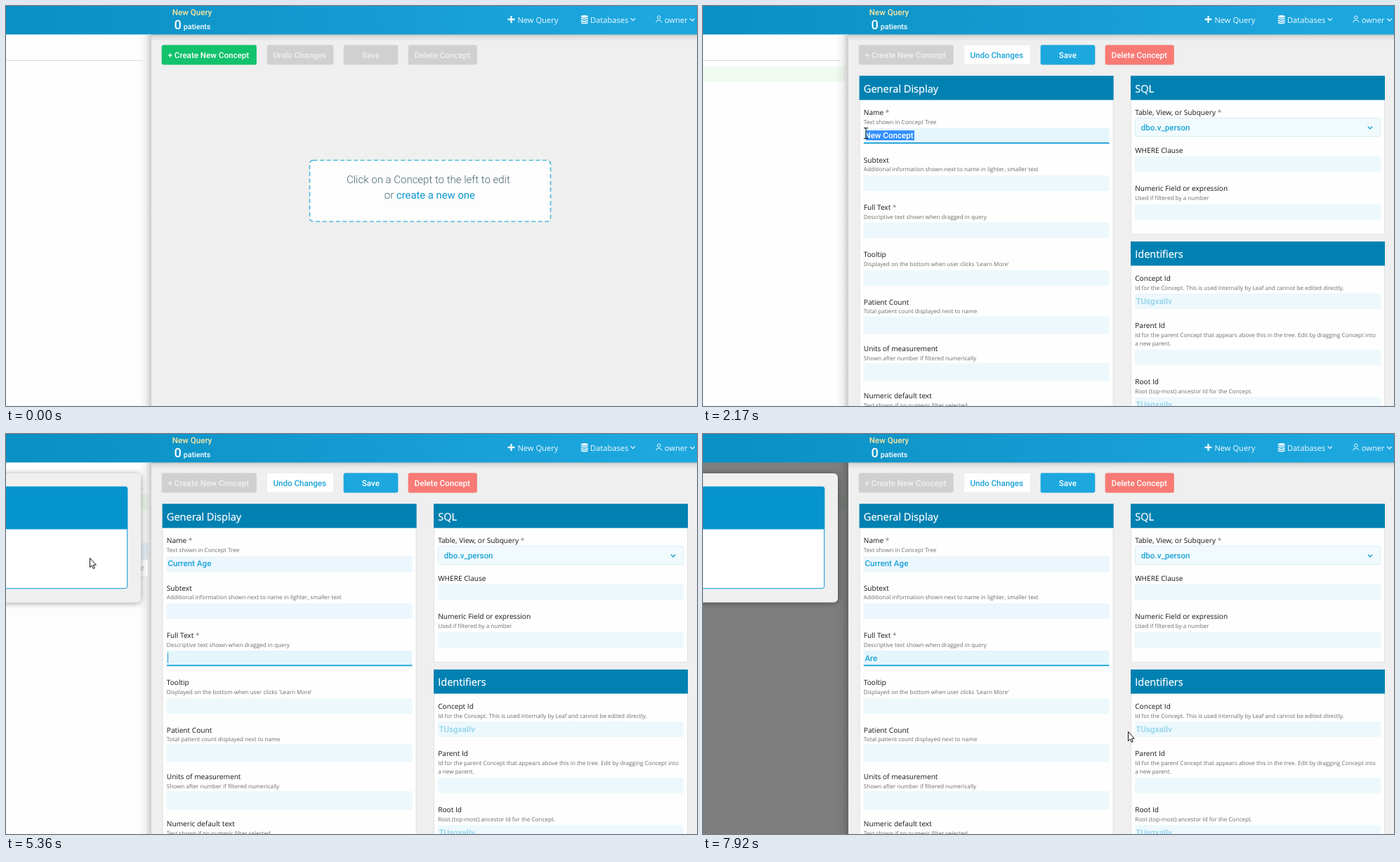
Recreate the animation shown at these times as an HTML page. Size 984 by 569 pixels, loop 8000 ms.

```html
<!DOCTYPE html>
<html lang="en">
<head>
<meta charset="utf-8">
<title>Concept editor</title>
<style>
html, body { margin: 0; width: 100%; height: 100%; overflow: hidden; background: #fefefe; }
svg { display: block; text-rendering: geometricPrecision; }
text { white-space: pre; }
.label { font: 10.15px "Open Sans", "Noto Sans", sans-serif; fill: #161616; }
.note { font: 8.15px "Open Sans", "Noto Sans", sans-serif; fill: #6c6c6c; }
.title { font: 14.55px "Open Sans", "Noto Sans", sans-serif; fill: #fff; stroke: #fff; stroke-width: .25px; }
.nav { font: 11.15px "Open Sans", "Noto Sans", sans-serif; fill: #f2fafe; }
.value { font: 500 11.6px Roboto, sans-serif; fill: #1ca4d8; }
.prompt { font: 300 15px Roboto, sans-serif; fill: #48676b; }
</style>
</head>
<body>
<svg id="stage" width="984" height="569" viewBox="0 0 984 569">
  <defs>
    <linearGradient id="bar" gradientUnits="userSpaceOnUse" x1="0" y1="40" x2="900" y2="0">
      <stop offset="0" stop-color="#0a90c2"/><stop offset=".5" stop-color="#139ad0"/><stop offset="1" stop-color="#1da7df"/>
    </linearGradient>
    <linearGradient id="side"><stop offset="0" stop-opacity="0"/><stop offset=".55" stop-opacity=".05"/><stop offset="1" stop-opacity=".2"/></linearGradient>
    <linearGradient id="under" x2="0" y2="1"><stop offset="0" stop-opacity=".2"/><stop offset=".4" stop-opacity=".07"/><stop offset="1" stop-opacity="0"/></linearGradient>
    <filter id="lift" x="-20%" y="-20%" width="140%" height="140%"><feDropShadow dx="0" dy="1" stdDeviation="4.5" flood-opacity=".38"/></filter>
  </defs>
</svg>
<script>
const LOOP = 8000;
const stage = document.getElementById('stage');
const pen = document.createElement('canvas').getContext('2d');

function add(tag, attrs = {}, parent = stage) {
  const el = document.createElementNS('http://www.w3.org/2000/svg', tag);
  for (const key in attrs) el.setAttribute(key, attrs[key]);
  parent.appendChild(el);
  return el;
}
const group = (parent = stage) => add('g', {}, parent);
const box = (parent, x, y, w, h, fill, more = {}) =>
  add('rect', { x, y, width: w, height: h, fill, ...more }, parent);
const path = (parent, d, stroke, width, fill = 'none', more = {}) =>
  add('path', { d, stroke, 'stroke-width': width, fill, ...more }, parent);
function text(parent, cls, x, y, str, style = '') {
  const el = add('text', { class: cls, x, y, style }, parent);
  el.textContent = str;
  return el;
}
const show = (el, on) => { el.style.display = on ? '' : 'none'; };
const clamp = (v) => Math.max(0, Math.min(1, v));

// left column
const left = group();
box(left, 0, 0, 207, 569, '#fefefe');
box(left, 0, 77, 195, 1, '#d8d8d8');
const newRow = box(left, 0, 155, 203, 22, '#f0faef');
const hoverRow = box(left, 0, 155, 203, 22, '#eaf6fd');
box(left, 189, 41, 18, 528, 'url(#side)');

const tip = group();
box(tip, 119, 178.5, 83, 25, '#fdfdfd', { rx: 2, stroke: '#e3e3e3' });
[[125, 189, 6], [129, 185, 10], [133, 191, 4]].forEach(([x, y, h]) => box(tip, x, y, 2.6, h, '#c4c4c4'));
text(tip, 'value', 141, 193.5, 'Learn More', 'font-size:11px;font-weight:400;fill:#bdbdbd');

const dim = box(stage, 0, 40, 207, 529, '#000');

const modal = group();
box(modal, -20, 56, 212, 183.4, '#efefef', { rx: 6, filter: 'url(#lift)' });
box(modal, -20, 75.3, 192.7, 144.4, '#fff', { rx: 3, stroke: '#0a94cf' });
path(modal, 'M-20 74.8H170Q173.2 74.8 173.2 78V135.4H-20Z', 'none', 0, '#0694ce');

// right side
const right = group();
box(right, 207, 40, 777, 529, '#efefef');
box(right, 207, 40, 777, 10, 'url(#under)');

function button(x, w, tx, label, fill, ink) {
  const face = (parent, color) => box(parent, x - .3, 55.6, w + .6, 27.8, color, { rx: 2.5 });
  face(right, '#d0d0d0');
  text(right, 'value', tx, 73.8, label, 'fill:#f0f0f0');
  const live = group(right);
  face(live, fill);
  text(live, 'value', tx, 73.8, label, 'fill:' + ink);
  return live;
}
const createBtn = button(222, 134.5, 230.5, '+ Create New Concept', '#12c26c', '#fff');
const editBtns = [
  button(372, 94, 380.4, 'Undo Changes', '#fefefe', '#1ba4da'),
  button(481, 77, 506.8, 'Save', '#1ca8de', '#fff'),
  button(573, 97.5, 581.6, 'Delete Concept', '#f87a75', '#fff')
];

const prompt = group(right);
box(prompt, 432.5, 219.5, 343, 87, '#fdfdfd', { rx: 5, stroke: '#52bad9', 'stroke-width': 1.7, 'stroke-dasharray': '6 3.6' });
text(prompt, 'prompt', 485, 251.8, 'Click on a Concept to the left to edit');
text(prompt, 'prompt', 538.8, 274, 'or');
const link = text(prompt, 'prompt', 556, 274, 'create a new one', 'font-weight:400;font-size:14.8px');

const editor = group(right);
function panel(x, y, h, title) {
  box(editor, x + .5, y + .5, 361, h, '#fefefe', { stroke: '#e2e2e2' });
  box(editor, x, y, 362, 34.4, '#0081b2');
  text(editor, 'title', x + 6.2, y + 23.2, title);
}
function field(x, y, label, notes, top, h = 22) {
  const star = label.endsWith('*');
  const t = text(editor, 'label', x, y, star ? label.slice(0, -1) : label);
  if (star) {
    const s = add('tspan', { fill: '#777' }, t);
    s.textContent = '*';
  }
  notes.forEach((n, i) => text(editor, 'note', x, y + 12.6 + i * 12.3, n));
  return top ? box(editor, x, top, 349.6, h, '#ecf8fc') : null;
}
panel(222.6, 99.3, 480, 'General Display');
const inputs = [
  field(228.8, 155.4, 'Name *', ['Text shown in Concept Tree'], 174),
  field(228.8, 222.8, 'Subtext', ['Additional information shown next to name in lighter, smaller text'], 241),
  field(228.8, 290, 'Full Text *', ['Descriptive text shown when dragged in query'], 308)
];
field(228.8, 357.4, 'Tooltip', ["Displayed on the bottom when user clicks 'Learn More'"], 376);
field(228.8, 424.6, 'Patient Count', ['Total patient count displayed next to name'], 441.5, 25);
field(228.8, 491.2, 'Units of measurement', ['Shown after number if filtered numerically'], 508, 26);
field(228.8, 558.4, 'Numeric default text', ['Text shown if no numeric filter selected']);

panel(609, 99.3, 225, 'SQL');
field(615.2, 155.4, 'Table, View, or Subquery *', []);
box(editor, 615.5, 159.5, 349, 26, '#f1fbfe', { rx: 2, stroke: '#d9edf5' });
text(editor, 'value', 623.8, 176.8, 'dbo.v_person');
path(editor, 'M946.8 171.5L950 174.8L953.2 171.5', '#1a9fd3', 1.4);
field(615.2, 209, 'WHERE Clause', [], 214);
field(615.2, 263.2, 'Numeric Field or expression', ['Used if filtered by a number'], 282);

panel(609, 335, 260, 'Identifiers');
field(615.2, 391, 'Concept Id', ['Id for the Concept. This is used internally by Leaf and cannot be edited directly.'], 409);
field(615.2, 458.2, 'Parent Id', ['Id for the parent Concept that appears above this in the tree. Edit by dragging Concept into', 'a new parent.'], 489);
field(615.2, 538, 'Root Id', ['Root (top-most) ancestor Id for the Concept.'], 556.5);
[424, 571].forEach((y) => text(editor, 'value', 616.5, y, 'TUsgxaIIv', 'fill:#8ed2ec'));

const underline = box(editor, 228.8, 0, 349.6, 1.8, '#189fd4');
const nameText = text(editor, 'value', 230.4, 188.2, '');
const fullText = text(editor, 'value', 230.4, 322.8, '');
const marked = box(editor, 230, 177, 71, 14, '#3390ff');
const markedText = text(editor, 'value', 230.4, 188.2, 'New Concept', 'fill:#fff');
const clip = add('clipPath', { id: 'markClip' }, editor);
const clipBox = box(clip, 230, 177, 71, 14, '#000');
marked.setAttribute('clip-path', 'url(#markClip)');
markedText.setAttribute('clip-path', 'url(#markClip)');
const caret = box(editor, 230, 0, 1, 14.5, '#189fd4');

// top bar
const head = group();
box(head, 0, 0, 984, 40.5, 'url(#bar)');
text(head, 'value', 236.8, 13.2, 'New Query', 'fill:#fbe7a0');
text(head, 'value', 239.6, 33.2, '0', 'font-size:18.2px;fill:#fff');
text(head, 'value', 252.8, 33.2, 'patients', 'font-size:10.6px;fill:#fff');
text(head, 'nav', 728.4, 23.6, 'New Query');
text(head, 'nav', 832, 23.6, 'Databases');
text(head, 'nav', 937.8, 23.6, 'owner');
const ICON = '#eaf7fd';
path(head, 'M719.5 14V24M714.5 19H724.5', ICON, 2.3);
path(head, 'M889.6 17.4L892.8 20.6L896 17.4M974.2 18L977.4 21.2L980.6 18', ICON, 1.3);
add('ellipse', { cx: 823.8, cy: 14.8, rx: 5, ry: 1.9, fill: ICON }, head);
[16.4, 19.6, 22.4].forEach((y) => path(head, `M818.8 ${y}Q823.8 ${y + 2.6} 828.8 ${y}V${y + 1.8}Q823.8 ${y + 4.4} 818.8 ${y + 1.8}Z`, 'none', 0, ICON));
add('circle', { cx: 929.7, cy: 16.3, r: 2.3, fill: 'none', stroke: ICON }, head);
path(head, 'M925.8 23.6V22.6Q926 20.4 929.7 20.4Q933.4 20.4 933.6 22.6V23.6', ICON, 1);

// mouse pointers
const mouse = group();
const shape = (d, fill) => path(mouse, d, '#111', 1, fill, { 'stroke-linejoin': 'round' });
const pointers = {
  arrow: shape('M.5 .5V13.6L3.4 11L5.3 15.6L7.3 14.7L5.4 10.2H9.4Z', '#fff'),
  finger: shape('M-1 .5Q.5 -1.2 2 .5V5L8 6.3Q9.5 7 9 9L7.5 15H0L-4 9Q-4 7 -2.2 7.6L-1 9Z', '#fff'),
  beam: shape('M-3 -7.5H3M0 -7.5V7.5M-3 7.5H3', 'none'),
  grab: shape('M-2.6 6.5L-6 1Q-6.2 -1 -4.4 -.4L-3 1.2L-4 -3.4Q-3.4 -5.6 -2 -3.8L-1.4 -1V-5Q-.4 -7.4 .8 -5L1 -1.2L1.8 -4.6Q3.2 -6.4 3.8 -4L3.6 -.8L4.6 -2.6Q6.2 -3.6 6.2 -1.4L4.6 3.4L3.6 6.5Z', '#fff')
};

// [start, end, x0, y0, x1, y1]
const moves = [
  [70, 610, 897, 551, 582, 265],
  [1560, 1950, 582, 265, 312, 185],
  [2000, 2400, 312, 185, 119, 175],
  [5360, 5360, 119, 175, 119, 176],
  [7470, 7770, 119, 176, 570, 424],
  [7920, 7920, 570, 424, 605, 423]
];
const looks = [[0, 'arrow'], [540, 'finger'], [1160, 'arrow'], [1880, 'beam'], [2280, 'grab'], [5360, 'arrow']];
const nameKeys = [2950, 3100, 3190, 3330, 3420, 3560, 3710, 3790, 4020, 4250, 4420];
const fullKeys = [6760, 7000, 7160];
const focusTimes = [2020, 5130, 5360];

function mouseAt(t) {
  let [, , x, y] = moves[0];
  for (const [a, b, x0, y0, x1, y1] of moves) {
    if (t < a) break;
    const p = b > a ? clamp((t - a) / (b - a)) : 1;
    const e = p * (.6 + p * (1.2 - .8 * p));
    x = x0 + (x1 - x0) * e;
    y = y0 + (y1 - y0) * e;
  }
  return [x, y];
}
const countPast = (list, t) => list.filter((k) => k <= t).length;
function widthOf(str) {
  pen.font = '500 11.6px Roboto, sans-serif';
  return pen.measureText(str).width;
}

function draw(t) {
  const open = t >= 1160;
  show(prompt, !open);
  show(editor, open);
  link.style.fill = t >= 540 ? '#1ca8dd' : '#0d97cd';

  const k = clamp((t - 1380) / 220);
  createBtn.setAttribute('opacity', 1 - k);
  editBtns.forEach((b) => b.setAttribute('opacity', k));

  show(newRow, open);
  newRow.setAttribute('y', t < 1600 ? 155 : 86);
  const hover = t >= 2300 && t < 5440;
  show(hoverRow, hover);
  show(tip, hover);
  show(modal, t >= 5360);
  dim.setAttribute('opacity', .5 * Math.sin(clamp((t - 5360) / 370) * Math.PI / 2));

  const [mx, my] = mouseAt(t);
  show(mouse, t >= 70);
  mouse.setAttribute('transform', `translate(${Math.round(mx)} ${Math.round(my)})`);
  const look = looks[countPast(looks.map((l) => l[0]), t) - 1][1];
  for (const name in pointers) show(pointers[name], name === look);

  const typed = countPast(nameKeys, t);
  const name = typed ? 'Current Age'.slice(0, typed) : 'New Concept';
  const full = 'Are'.slice(0, countPast(fullKeys, t));
  nameText.textContent = name;
  fullText.textContent = full;

  const picking = t >= 2020 && t < 2950;
  const from = Math.max(230, Math.min(301, mx));
  clipBox.setAttribute('x', from);
  clipBox.setAttribute('width', 301 - from);
  show(marked, picking);
  show(markedText, picking);

  const focus = countPast(focusTimes, t) - 1;
  inputs.forEach((el, i) => el.setAttribute('fill', i === focus ? '#e5f5fc' : i < focus ? '#ebf6fd' : '#ecf8fc'));
  show(underline, focus >= 0);
  const since = Math.max(...[...focusTimes, ...nameKeys, ...fullKeys].filter((v) => v <= t));
  const lit = Math.floor((t - since) / 540) % 2 === 0;
  show(caret, focus >= 0 && !picking && lit);
  if (focus >= 0) {
    underline.setAttribute('y', [194, 261.2, 328.4][focus]);
    caret.setAttribute('y', [177, 244, 311.2][focus]);
    caret.setAttribute('x', Math.floor(230.4 + widthOf([name, '', full][focus])));
  }
}

const start = performance.now();
function tick() {
  draw((performance.now() - start) % LOOP);
  requestAnimationFrame(tick);
}
tick();
</script>
</body>
</html>
```
